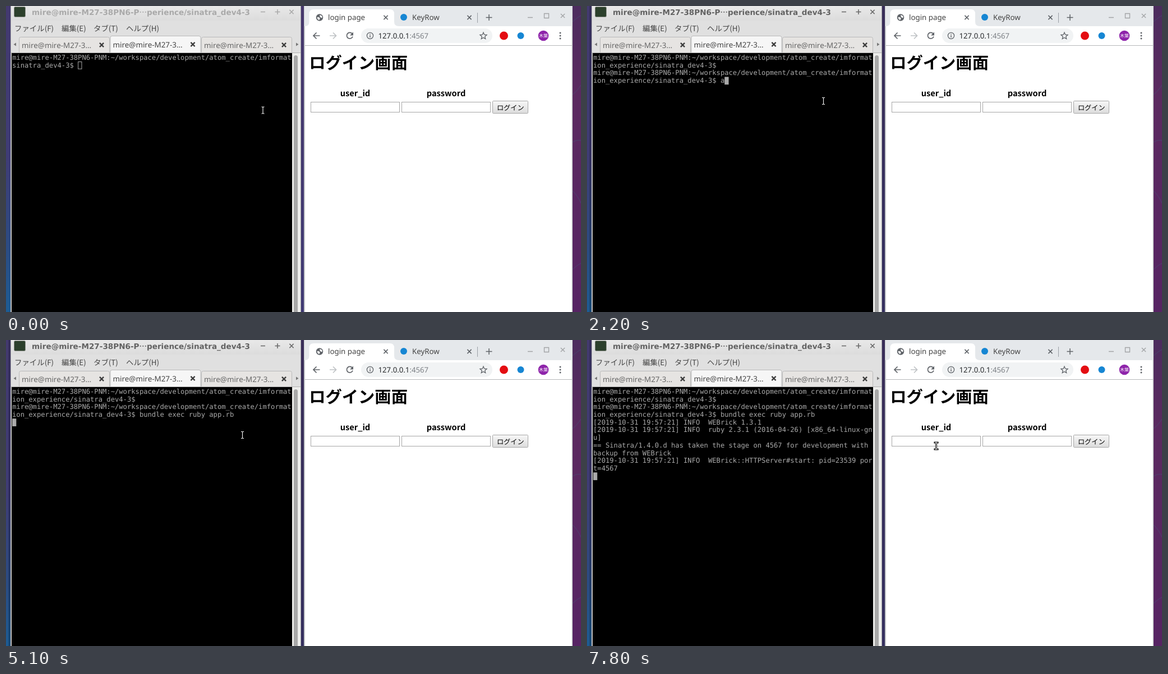
An HTML page for the animation above (8000 ms loop, 1025 by 546 pixels).

```html
<!DOCTYPE html>
<html lang="ja">
<head>
<meta charset="utf-8">
<title>Login demo</title>
<style>
html, body { margin: 0; width: 100%; height: 100%; overflow: hidden; background: #fff; }
svg { display: block; width: 1025px; height: 546px; }
text { white-space: pre; text-rendering: geometricPrecision; }
.ui { font: 13.42px "Noto Sans", "Noto Sans CJK JP", sans-serif; fill: #444; }
.menu { font-family: "Noto Sans CJK JP", sans-serif; }
.title { font: bold 13.55px "DejaVu Sans", sans-serif; }
.term { font: 12.16px "DejaVu Sans Mono", monospace; fill: #aaa; }
.tab { font-size: 13.3px; }
.url { font-size: 13.2px; fill: #26282b; }
.page { font-family: "Noto Sans CJK JP", "Noto Sans", sans-serif; fill: #000; }
.head { font-size: 14.64px; font-weight: bold; text-anchor: middle; }
.line { fill: none; stroke-linecap: butt; }
</style>
</head>
<body>
<svg viewBox="0 0 1025 546">
  <defs>
    <linearGradient id="wallLeft" x2="0" y2="1">
      <stop stop-color="#43396f"/><stop offset=".5" stop-color="#3f3c76"/>
      <stop offset=".8" stop-color="#2b4c83"/><stop offset="1" stop-color="#1d5c94"/>
    </linearGradient>
    <linearGradient id="wallMid" x2="0" y2="1">
      <stop stop-color="#46386c"/><stop offset="1" stop-color="#403a74"/>
    </linearGradient>
    <linearGradient id="wallRight" x2="0" y2="1">
      <stop stop-color="#4c2c5e"/><stop offset=".3" stop-color="#5b2a60"/><stop offset="1" stop-color="#562463"/>
    </linearGradient>
    <linearGradient id="bar" x2="0" y2="1">
      <stop stop-color="#e9e9e9"/><stop offset="1" stop-color="#dcdcdc"/>
    </linearGradient>
    <linearGradient id="button" x2="0" y2="1">
      <stop stop-color="#f7f7f7"/><stop offset="1" stop-color="#dcdcdc"/>
    </linearGradient>
    <path id="cross" d="M-3.6-3.6 3.6 3.6M-3.6 3.6 3.6-3.6"/>
    <path id="beamShape" d="M-2.500-6H-1L0-5.300 1-6H2.500M0-5.500V5.500M-2.500 6H-1L0 5.300 1 6H2.500"/>
  </defs>

  <!-- desktop -->
  <rect width="12" height="546" fill="url(#wallLeft)"/>
  <rect x="522" width="14" height="546" fill="url(#wallMid)"/>
  <rect x="1008" width="17" height="546" fill="url(#wallRight)"/>
  <path class="line" stroke="#3b6c86" stroke-opacity=".4"
    d="M1010 28Q1019 20 1025 17M1010 158Q1017 153 1025 141M1010 243Q1018 238 1025 240M1010 330Q1019 338 1025 352M1010 470Q1018 462 1025 459"/>
  <g id="shadow" fill="#000" fill-opacity=".18">
    <rect x="4" width="4" height="546"/><rect x="526" width="5" height="546"/>
  </g>

  <!-- terminal window -->
  <rect x="8" width="518" height="546" fill="#e0e0e0"/>
  <rect x="8" width="518" height="26" fill="url(#bar)"/>
  <rect x="14.500" y="1.500" width="20" height="18" rx="2" fill="#2c402c" stroke="#8b8f88"/>
  <text id="title" class="title" x="46" y="16">mire@mire-M27-38PN6-P<tspan font-family="Noto Sans CJK JP, sans-serif">⋯</tspan>perience/sinatra_dev4-3</text>
  <g id="controls" class="line" stroke-width="1.500">
    <path d="M454 10.500h8M479.500 10.500h9M484 6v9"/><use href="#cross" x="509" y="10.500"/>
  </g>
  <g class="ui menu">
    <text x="15" y="45">ファイル(F)</text><text x="99" y="45">編集(E)</text>
    <text x="156" y="45">タブ(T)</text><text x="214" y="45">ヘルプ(H)</text>
  </g>
  <g id="tabs"></g>
  <path d="M18 65.500v6l-4.500-3zM517 65.500v6l4.500-3z" fill="#777"/>
  <path class="line" stroke="#b4b4b4" d="M9 83.500H526"/>
  <rect x="10" y="84" width="500" height="462"/>
  <rect x="510" y="84" width="15" height="462" fill="#eeeeec"/>
  <rect x="513" y="88" width="7" height="470" rx="3.500" fill="#a8a8a8"/>
  <path class="line" stroke="#a5a5a8" d="M8.500 0V546M525.500 0V546"/>
  <g id="rows" class="term"></g>
  <rect id="caret"/>

  <!-- browser window -->
  <rect x="531" width="479" height="546" fill="#c4c7ca"/>
  <rect x="533" width="475.500" height="546" fill="#fff"/>
  <rect x="532" width="477" height="36" fill="#e5e8eb"/>
  <path fill="#fff" d="M533 36q7.500 0 7.500-8V14q0-8 8-8h136q7.500 0 7.500 8v14q0 8 8 8z"/>
  <circle cx="559" cy="20.500" r="6.200" fill="#5f6368"/>
  <path fill="#fff" d="M554.500 20q3-1 4.500 1t-1 4q-3-1-3.500-5M559 16.500q3-1 5 3-1 3-3 1t-2-4"/>
  <g class="ui tab"><text x="574" y="25">login page</text><text x="724" y="25">KeyRow</text></g>
  <circle cx="709" cy="20" r="6" fill="#1686d3"/>
  <g class="line" stroke="#5f6368" stroke-width="1.500">
    <use href="#cross" x="677" y="20.500"/><use href="#cross" x="826" y="20.500"/>
    <path d="M855.500 20.500h11M861 15v11"/>
    <path stroke="#9aa0a6" stroke-width="1" d="M840.500 12v18"/>
  </g>
  <g class="line" stroke="#a3a5a7" stroke-width="1.400">
    <path d="M930 20.500h9M959.500 13.500h8v8h-8z"/><use href="#cross" x="992.500" y="17.500"/>
  </g>
  <g class="line" stroke="#5f6368" stroke-width="1.700">
    <path d="M559.500 53H548M553.500 47.500 548 53l5.500 5.500"/>
    <path stroke="#bfc2c5" d="M577 53h11.500M583 47.500l5.500 5.500-5.500 5.500"/>
    <path d="M617 49.300A5.400 5.400 0 1 0 618 54.500"/>
  </g>
  <path fill="#5f6368" d="M619 46.500v6h-6z"/>
  <rect x="633" y="40" width="234" height="26" rx="13" fill="#f1f3f4"/>
  <circle class="line" cx="649" cy="53" r="5.600" stroke="#5f6368" stroke-width="1.300"/>
  <path class="line" stroke="#5f6368" stroke-width="1.400" d="M649 49.500v1.500M649 52v4.300"/>
  <text class="ui url" x="663.500" y="58">127.0.0.1<tspan fill="#7b7f84">:4567</tspan></text>
  <path class="line" stroke="#5f6368" stroke-width="1.300"
    d="M851 47.200l1.700 4 4.300.4-3.300 2.800 1 4.200-3.700-2.200-3.700 2.200 1-4.200-3.300-2.800 4.300-.4z"/>
  <circle cx="887.500" cy="53" r="7.500" fill="#e40d12"/>
  <circle cx="917.500" cy="53" r="6" fill="#1686d3"/>
  <circle cx="958" cy="53" r="9.300" fill="#8e24aa"/>
  <text class="page" x="958" y="56" font-size="8" text-anchor="middle" style="fill:#fff">木葉</text>
  <g fill="#5f6368"><circle cx="988" cy="48" r="1.500"/><circle cx="988" cy="53" r="1.500"/><circle cx="988" cy="58" r="1.500"/></g>
  <path class="line" stroke="#b6b8ba" d="M533 70.500H1009"/>

  <g class="page">
    <text x="540.300" y="112.200" font-size="29.280" font-weight="bold">ログイン画面</text>
    <text class="head" x="622.500" y="161">user_id</text>
    <text class="head" x="784.500" y="161">password</text>
    <g fill="#fff" stroke="#a6a6a6">
      <rect x="543.500" y="171.500" width="158" height="18"/><rect x="705.500" y="171.500" width="158" height="18"/>
      <rect x="867.500" y="169.500" width="63" height="22" rx="1" fill="url(#button)"/>
    </g>
    <text x="899.300" y="185.500" font-size="12.200" text-anchor="middle">ログイン</text>
  </g>

  <!-- pointers -->
  <g id="beam" class="line">
    <use href="#beamShape" stroke="#000" stroke-width="3" stroke-linecap="square"/>
    <use href="#beamShape" stroke="#fff" stroke-width="1.100"/>
  </g>
  <path id="arrow" d="M.5.800V15.500L4 12.200l2.500 5.800 2.400-1L6.500 11.500h5z" fill="#fff" stroke="#000"/>
</svg>

<script>
const LOOP = 8000, LEFT = 11, TOP = 85.3, COL = 7.32, ROW = 13.73;
const $ = id => document.getElementById(id);
const SVG = "http://www.w3.org/2000/svg";

const prompt = "mire@mire-M27-38PN6-PNM:~/workspace/development/atom_create/imformat";
const folder = "ion_experience/sinatra_dev4-3$ ";
const launch = "bundle exec ruby app.rb";
const shell = command => [prompt, folder, prompt, folder + command];
const stamp = "[2019-10-31 19:57:21] INFO  ";
const log = [
  stamp + "WEBrick 1.3.1",
  stamp + "ruby 2.3.1 (2016-04-26) [x86_64-linux-gn",
  "u]",
  "== Sinatra/1.4.0.d has taken the stage on 4567 for development with ",
  "backup from WEBrick",
  stamp + "WEBrick::HTTPServer#start: pid=23539 por",
  "t=4567",
  ""
];

// Each entry holds from its time until the next one.
const screens = [
  [0, [prompt, "sinatra_dev4-3$ "]],
  [1300, shell("")],
  [1600, shell("ls")],
  [2200, shell("a")],
  [3000, shell("exit")],
  [3300, shell("ls")],
  [3500, shell("cd")],
  [3700, shell("ka")],
  [4100, shell("exit")],
  [4300, shell(launch)],
  [5100, [...shell(launch), ""]],
  [5700, [...shell(launch), ...log]]
];
const pointers = [
  [0, "beam", 458, 186],
  [100, "beam", 447, 181],
  [200, "beam", 430, 173],
  [300, "beam", 421.5, 169.5],
  [6500, "none", 0, 0],
  [6800, "arrow", 607, 122],
  [7000, "arrow", 606, 150],
  [7100, "arrow", 604, 168.5],
  [7300, "beam", 616, 180],
  [7400, "beam", 622.5, 182.5],
  [7600, "beam", 622.5, 187],
  [7800, "beam", 622.5, 189]
];
const at = (list, t) => list.findLast(entry => entry[0] <= t);

$("tabs").innerHTML = [24, 186.5, 349].map((x, i) => {
  const active = i === 1, y = active ? 53.5 : 55.5;
  return `<path d="M${x - .5} 84V${y + 3}q0-3 3-3h155q3 0 3 3V84" fill="${active ? "#f6f6f6" : "#e6e4e2"}" stroke="#b9b9b9"/>
    <text class="ui" x="${x + 4}" y="${active ? 73.5 : 74.5}" style="fill:${active ? "#444" : "#666"}">mire@mire-M27-3…</text>
    <use href="#cross" x="${x + 146.5}" y="${active ? 68.5 : 69.5}" stroke="#3c3c3c" stroke-width="2.300"/>`;
}).join("");

const rows = Array.from({ length: 12 }, (_, i) => {
  const row = document.createElementNS(SVG, "text");
  row.setAttribute("x", LEFT);
  row.setAttribute("y", TOP + i * ROW + 10.5);
  return $("rows").appendChild(row);
});

function set(el, attrs) {
  for (const name in attrs) el.setAttribute(name, attrs[name]);
}

function drawScreen(lines, focused) {
  rows.forEach((row, i) => {
    const line = lines[i] || "";
    if (row.textContent !== line) row.textContent = line;
  });
  const last = lines.length - 1;
  const inset = focused ? 0 : .5;
  set($("caret"), {
    x: LEFT + lines[last].length * COL + inset,
    y: TOP + last * ROW + inset,
    width: COL - 2 * inset,
    height: ROW - 2 * inset,
    fill: focused ? "#aaa" : "none",
    stroke: focused ? "none" : "#aaa"
  });
}

function drawPointer([, kind, x, y]) {
  for (const id of ["beam", "arrow"]) {
    set($(id), { visibility: id === kind ? "visible" : "hidden", transform: `translate(${x} ${y})` });
  }
}

function draw(now) {
  const t = now % LOOP, focused = t >= 500;
  set($("title"), { fill: focused ? "#626262" : "#a9a9a9" });
  set($("controls"), { stroke: focused ? "#666" : "#a9a9a9" });
  set($("shadow"), { visibility: focused ? "visible" : "hidden" });
  drawScreen(at(screens, t)[1], focused);
  drawPointer(at(pointers, t));
}

const start = performance.now();
function tick() {
  draw(performance.now() - start);
  requestAnimationFrame(tick);
}
tick();
</script>
</body>
</html>
```
